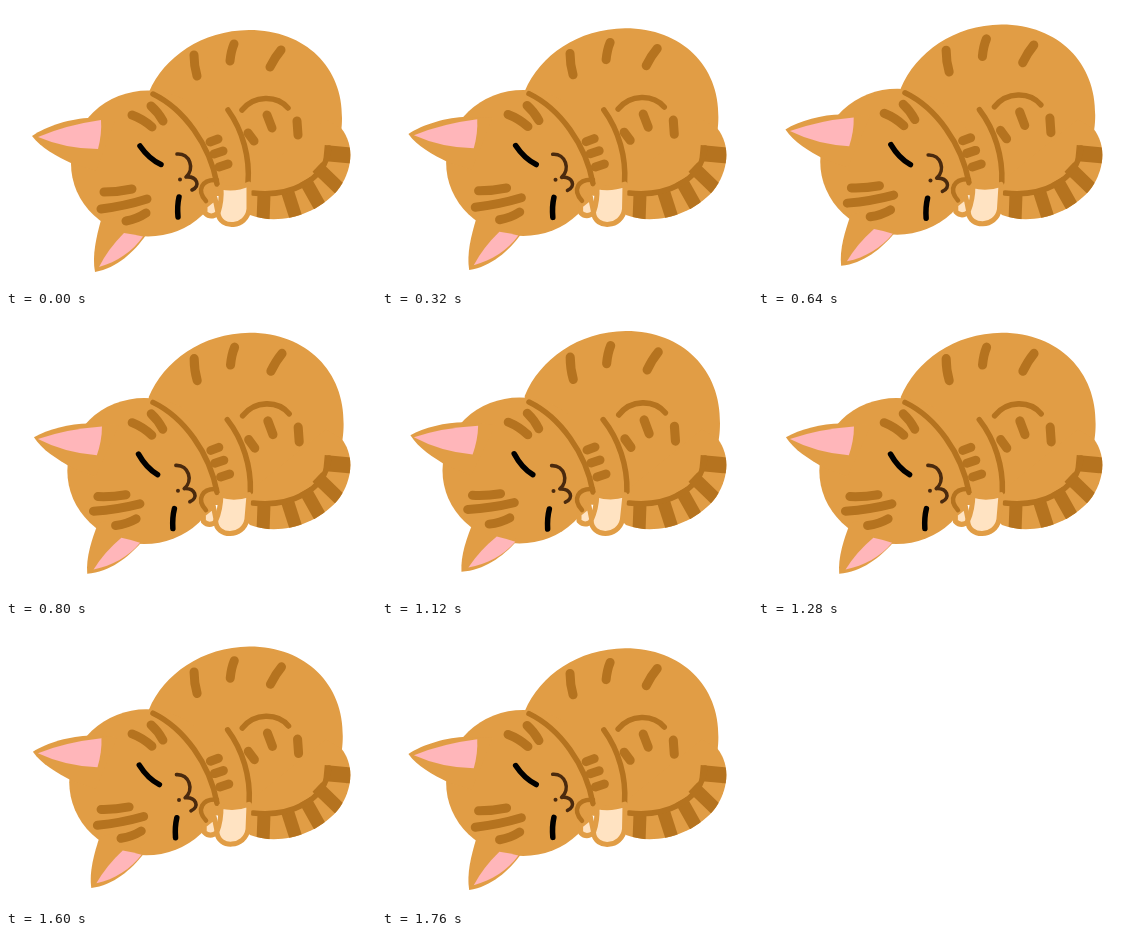
Write an HTML page that moves like this. It is 370 by 282 pixels and loops after 1920 ms.

```html
<!DOCTYPE html>
<html lang="en">
<head>
<meta charset="utf-8">
<title>Sleeping cat</title>
<style>
  html, body { margin: 0; width: 100%; height: 100%; overflow: hidden; background: #fff; }
  svg { display: block; width: 370px; height: 282px; }
  path, circle, ellipse { transform-box: fill-box; transform-origin: center; }
  #body { transform-origin: 170px 214px; }
  .fur { fill: #e19d45; }
  .pink { fill: #ffb6ba; }
  .cream { fill: #ffe3c2; stroke: #e19d45; stroke-width: 5; stroke-linejoin: round; }
  .mark, .line, .band, .eye, .mouth { fill: none; stroke: #b5731f; stroke-linecap: round; stroke-linejoin: round; }
  .mark { stroke-width: 9; }
  .line { stroke-width: 5.5; }
  .band { stroke-width: 13; stroke-linecap: butt; }
  .eye { stroke: #000; stroke-width: 5.5; }
  .mouth { stroke: #4a2a0e; stroke-width: 3.6; }
</style>
</head>
<body>
<!-- data-move: x shift, y shift and turn in degrees at the fullest breath -->
<svg viewBox="0 0 370 282">
  <clipPath id="tailShape">
    <path id="tail" d="M320 113 L335 122 C349 139 347 165 331 185 C308 211 270 219 244 209 L225 190 Z"/>
  </clipPath>

  <g id="body">
    <path class="fur" d="M143 86 C158 51 196 24.500 243 24 C300 24 337 62 336 112 C336 130 332 150 310 190 L150 190 Z"/>
    <path class="mark" d="M188 49 Q188 60 191 70"/>
    <path class="mark" d="M228 38 Q225 45 224 55"/>
    <path class="mark" d="M275 44 Q269 51 264 61"/>
    <path class="mark" d="M261 109 L266 122"/>
    <path class="mark" d="M291 115 L292 129"/>
    <path class="mark" d="M242 127 L248 135"/>
    <path class="line" d="M236 104 C248 89 271 89 282 102"/>
  </g>

  <use href="#tail" class="fur"/>
  <g clip-path="url(#tailShape)">
    <path class="band" d="M258 188 L257 216"/>
    <path class="band" d="M281 184 L291 215"/>
    <path class="band" d="M299 174 L317 206"/>
    <path class="band" d="M311 161 L339 188"/>
    <path class="band" style="stroke-width:16" d="M318 147 L350 150"/>
  </g>
  <path class="line" d="M247 187 C283 191 319 176 323 142"/>

  <ellipse class="fur" cx="142" cy="157.500" rx="77" ry="73" data-move="-4.500 -3 0"/>
  <path class="fur" d="M26 130 C40 120 66 112 85 112 L110 112 L90 165 L67 158 C50 150 35 142 26 130 Z" data-move="1.500 -7 5"/>
  <path class="pink" d="M32 131 Q60 119 95 114 Q96 128 92 143 Q60 143 32 131 Z" data-move="0 -7 5"/>
  <path class="fur" d="M89 266 C86 250 90 232 95 214 L125 205 L140 229 C128 246 111 262 89 266 Z" data-move="-6 -7 7"/>
  <path class="pink" d="M93 261 Q102 243 118 227 Q127 228 137 230.500 C127 245 111 256 93 261 Z" data-move="-5 -7 6"/>

  <path class="mark" d="M126 109 Q137 113 146 121" data-move="0 -2.500 2"/>
  <path class="mark" d="M145 100 Q152 106 157 115" data-move="0 -2.500 2"/>
  <path class="mark" d="M98 186 Q112 186 126 183" data-move="-7.500 -6 3"/>
  <path class="mark" d="M95 203 Q119 200 141 193" data-move="-9 -8 4"/>
  <path class="mark" d="M120 215 Q131 213 140 207" data-move="-12.500 -6 5"/>

  <path class="eye" d="M134 140 Q143 153 155 158.500" data-move="-3 -1 7"/>
  <path class="eye" d="M173 191 Q171 200 172 211" data-move="-6 2 2"/>
  <path class="mouth" d="M171 148 C184 147 189 163 180 171 C191 170 195 180 186 184" data-move="-2 2 2"/>
  <circle cx="174" cy="173.500" r="2" fill="#4a2a0e" data-move="-2.500 1.500 0"/>

  <path class="mark" d="M204 136 L212 133" data-move="1 -2 0"/>
  <path class="mark" d="M208 148 L217 145" data-move="1 -1 0"/>
  <path class="mark" d="M213 161 L222 158" data-move="2 0 0"/>
  <path class="line" d="M147 88 C178 103 204 139 211 178" data-move="0 -2 0"/>
  <path class="line" d="M222 104 C237 125 244 152 242 177" data-move="1 -1 -3"/>

  <path class="cream" d="M199 200 L209 192 L212 207 Q205 213 199 207 Z" data-move="-2 -2 0"/>
  <path class="cream" d="M215 181 Q229 184 243 178 L243 203 C241 222 214 224 212 207 Q216 195 215 181 Z" data-move="-2 -1 6"/>
  <path class="line" style="stroke-width:4.500" d="M211 174 C196 173 190 184 200 195" data-move="0 -1 0"/>
</svg>
<script>
  const STEP = 160;
  const poses = [0, 1, 2, 3, 4, 5, 6, 7, 5, 4, 3, 2];
  const body = document.getElementById('body');
  const parts = [...document.querySelectorAll('[data-move]')].map(el => ({
    el, move: el.dataset.move.split(' ').map(Number)
  }));

  function draw(now) {
    const pose = poses[Math.floor(now / STEP) % poses.length];
    const breath = (1 - Math.cos(Math.PI * pose / 7)) / 2;
    body.style.transform = `scale(${1 + 0.012 * breath}, ${1 + 0.047 * breath})`;
    for (const { el, move } of parts) {
      const [x, y, turn] = move.map(v => v * breath);
      el.style.transform = `translate(${x}px, ${y}px) rotate(${turn}deg)`;
    }
    requestAnimationFrame(draw);
  }
  draw(performance.now());
</script>
</body>
</html>
```
